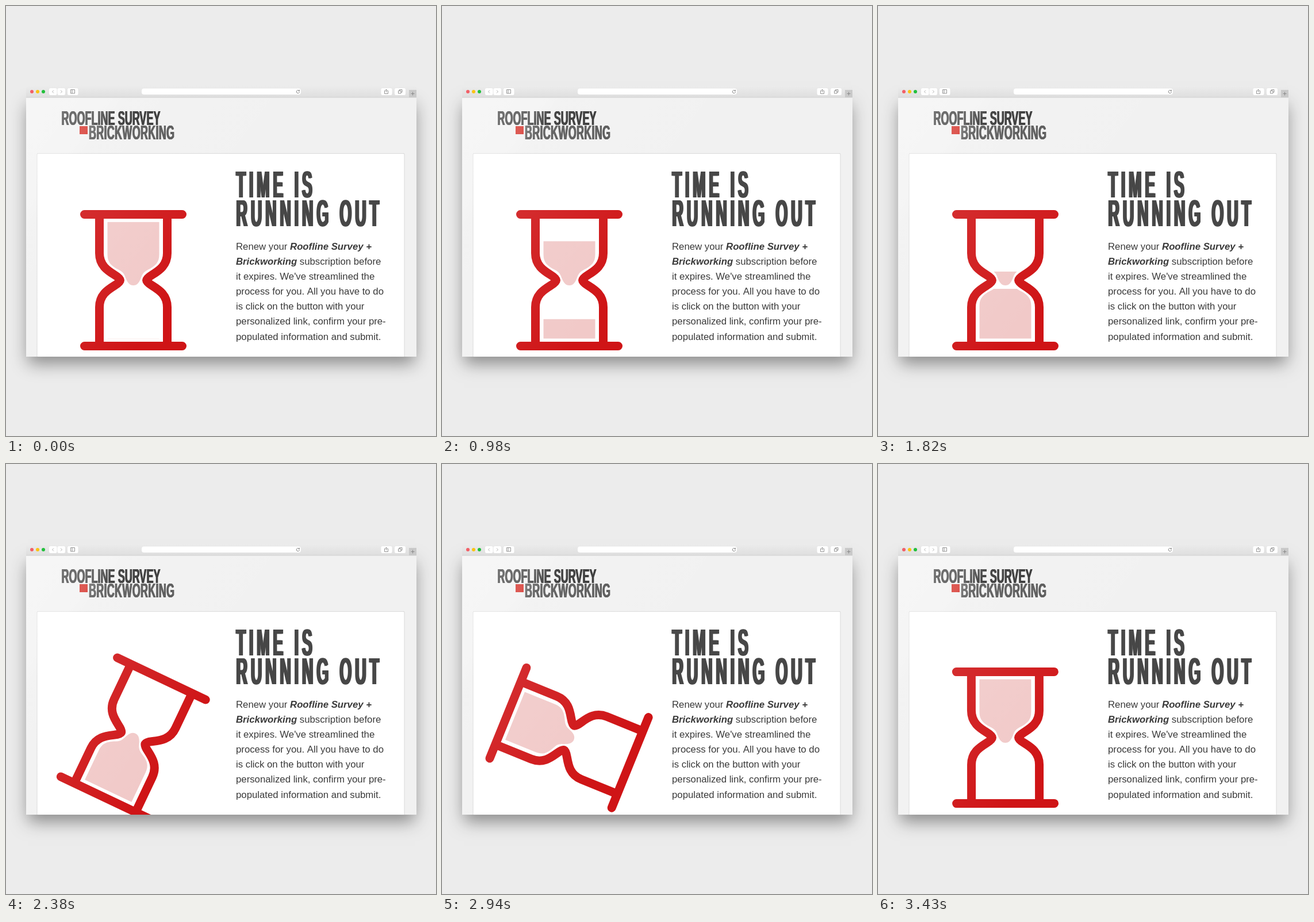
Recreate the animation shown at these times as an HTML page with a canvas. Size 748x748 px, loop 3500 ms.

```html
<!DOCTYPE html>
<html lang="en">
<head>
<meta charset="utf-8">
<title>Time is running out</title>
<style>
  html, body { margin: 0; width: 100%; height: 100%; overflow: hidden; background: #ececec; }
  canvas { display: block; width: 748px; height: 748px; }
</style>
</head>
<body>
<canvas id="stage" width="748" height="748"></canvas>
<script>
const ctx = document.getElementById('stage').getContext('2d');
const SANS = '"Liberation Sans", Arial, sans-serif';
const STEP = 70, STEPS = 50;

function box(x, y, w, h, r, fill) {
  ctx.beginPath();
  ctx.roundRect(x, y, w, h, r);
  ctx.fillStyle = fill;
  ctx.fill();
}

function dot(x, y, r, fill) {
  ctx.beginPath();
  ctx.arc(x, y, r, 0, Math.PI * 2);
  ctx.fillStyle = fill;
  ctx.fill();
}

function line(d, color, width = 1) {
  ctx.strokeStyle = color;
  ctx.lineWidth = width;
  ctx.stroke(new Path2D(d));
}

function ramp(x0, y0, x1, y1, ...stops) {
  const g = ctx.createLinearGradient(x0, y0, x1, y1);
  stops.forEach(([at, color]) => g.addColorStop(at, color));
  return g;
}

// Condensed display face: narrowed bold with its stems thickened again.
function display(text, x, y, { size, narrow, gap = 0, grow, fill }) {
  ctx.save();
  ctx.translate(x, y);
  ctx.scale(narrow, 1);
  ctx.font = `bold ${size}px ${SANS}`;
  ctx.letterSpacing = gap + 'px';
  ctx.fillStyle = fill;
  for (const dx of [-grow, 0, grow]) ctx.fillText(text, dx / narrow, 0);
  ctx.restore();
}

function drawWindow() {
  ctx.save();
  ctx.shadowColor = 'rgba(0,0,0,.42)';
  ctx.shadowBlur = 28;
  ctx.shadowOffsetY = 12;
  box(38, 160, 673, 450, 0, '#999');
  ctx.restore();

  box(35, 139, 679, 21, [4, 4, 0, 0], ramp(0, 139, 0, 159, [0, '#ececec'], [1, '#dedede']));
  box(35, 159, 679, 451, 0, '#f1f1f1');
  box(35, 158.5, 679, 1, 0, '#d2d2d2');

  dot(45, 149, 3, '#f25f67');
  dot(55, 149, 3, '#fbc312');
  dot(65, 149, 3, '#22c03c');

  for (const [x, w] of [[75, 13.5], [89.5, 13.5], [107, 18.5], [652.5, 19], [676, 19]])
    box(x, 143, w, 12, 2.5, '#fff');
  line('M83 146.5l-2.5 2.5 2.5 2.5M95 146.5l2.5 2.5-2.5 2.5', '#b4b4b4');
  line('M112.5 145.5h7v6.5h-7zM115 145.5v6.5', '#888', .9);
  line('M660 147.5h-1.5v5h6v-5h-1.5M661.5 150v-5M660 146.5l1.5-1.5 1.5 1.5', '#888', .9);
  line('M682.5 147.5h4.5v4.5h-4.5zM684.5 147.5v-2h4.5v4.5h-2', '#888', .9);

  box(236, 143.5, 277, 10.5, 4, '#fff');
  line('M509.8 147.3a2.6 2.6 0 1 0 .7 2M510.4 145.8v2h-2', '#777', .9);

  box(701, 146, 13, 13, 0, '#c9c9c9');
  line('M704.5 152.5h6M707.5 149.5v6', '#888');
}

function drawCopy() {
  const logo = { size: 35, narrow: .515, grow: .5 };
  display('ROOFLINE SURVEY', 96.5, 207, { ...logo, fill: '#2c2c2c' });
  display('BRICKWORKING', 144, 232, { ...logo, gap: .5, fill: '#525252' });
  box(128, 209, 14, 14, 0, '#d0180f');

  box(53.5, 256, 640, 380, 2, '#d9d9d9');
  box(54.5, 257, 638, 380, 1.5, '#fff');

  const head = { size: 64, narrow: .42, gap: 14, grow: 1.4, fill: '#474747' };
  display('TIME IS', 400.5, 333, head);
  display('RUNNING OUT', 400.5, 383, head);

  // Asterisks switch the emphasised style on and off.
  const copy = [
    'Renew your *Roofline Survey +',
    '*Brickworking* subscription before',
    "it expires. We've streamlined the",
    'process for you. All you have to do',
    'is click on the button with your',
    'personalized link, confirm your pre-',
    'populated information and submit.'
  ];
  ctx.fillStyle = '#3a3a3a';
  copy.forEach((row, i) => {
    let x = 400;
    row.split('*').forEach((part, j) => {
      ctx.font = `${j % 2 ? 'italic bold ' : ''}16.75px ${SANS}`;
      ctx.fillText(part, x, Math.round(423.6 + i * 26.15));
      x += ctx.measureText(part).width;
    });
  });
}

// Hourglass geometry, centred on its waist.
const half = s => `M${-59 * s} -114.5V-47C${-59 * s} -26 ${-45 * s} -17 ${-33 * s} -9.5` +
  `Q${-23 * s} -3.5 ${-23 * s} 0Q${-23 * s} 3.5 ${-33 * s} 9.5` +
  `C${-45 * s} 17 ${-59 * s} 26 ${-59 * s} 47V114.5`;
const frame = half(1) + half(-1) + 'M-85 -114.5H85M-85 114.5H85';
const sand = new Path2D('M-45 -101.5H45V-45C45 -31 39 -25 25 -18C15 -13 15 -7 12 -1' +
  'C9 6 5 9 0 9C-5 9 -9 6 -12 -1C-15 -7 -15 -13 -25 -18C-39 -25 -45 -31 -45 -45Z');

function drawSand(flip, top, bottom) {
  if (bottom <= top) return;
  ctx.save();
  ctx.beginPath();
  ctx.rect(-60, top, 120, bottom - top);
  ctx.clip();
  ctx.scale(1, flip);
  ctx.fillStyle = '#f1c9c8';
  ctx.fill(sand);
  ctx.restore();
}

// Steady flow, quicker once the bulb narrows.
const drained = k => Math.min(111, 2.4 * k + .143 * Math.max(0, k - 13) ** 2);

// The turn snaps off its rest, then slows slightly until it is upside down.
function turn(k) {
  if (k < 32) return 0;
  if (k < 34) return 16.4;
  const n = k - 34;
  return 25.4 + 11.45 * n - .0765 * n * n;
}

function drawHourglass(k) {
  const fall = drained(k);
  ctx.save();
  ctx.translate(221.5, 476.5);
  ctx.rotate(turn(k) * Math.PI / 180);
  ctx.translate(0, .5);
  ctx.lineCap = ctx.lineJoin = 'round';
  line(frame, '#cf1416', 15);
  drawSand(1, -101.5 + fall, 10);
  drawSand(-1, 101.5 - fall, 102);
  ctx.restore();
}

function drawSheen() {
  box(35, 160, 679, 450, 0, ramp(35, 160, 367, 412,
    [0, 'rgba(255,255,255,.4)'], [.28, 'rgba(255,255,255,.28)'],
    [.34, 'rgba(255,255,255,.13)'], [1, 'rgba(255,255,255,0)']));
}

function draw(k) {
  ctx.fillStyle = '#ececec';
  ctx.fillRect(0, 0, 748, 748);
  drawWindow();
  ctx.save();
  ctx.beginPath();
  ctx.rect(35, 160, 679, 450);
  ctx.clip();
  drawCopy();
  drawHourglass(k);
  drawSheen();
  ctx.restore();
}

const start = performance.now();
let shown = -1;
function tick() {
  const k = Math.floor((performance.now() - start) / STEP) % STEPS;
  if (k !== shown) draw(shown = k);
  requestAnimationFrame(tick);
}
tick();
</script>
</body>
</html>
```
